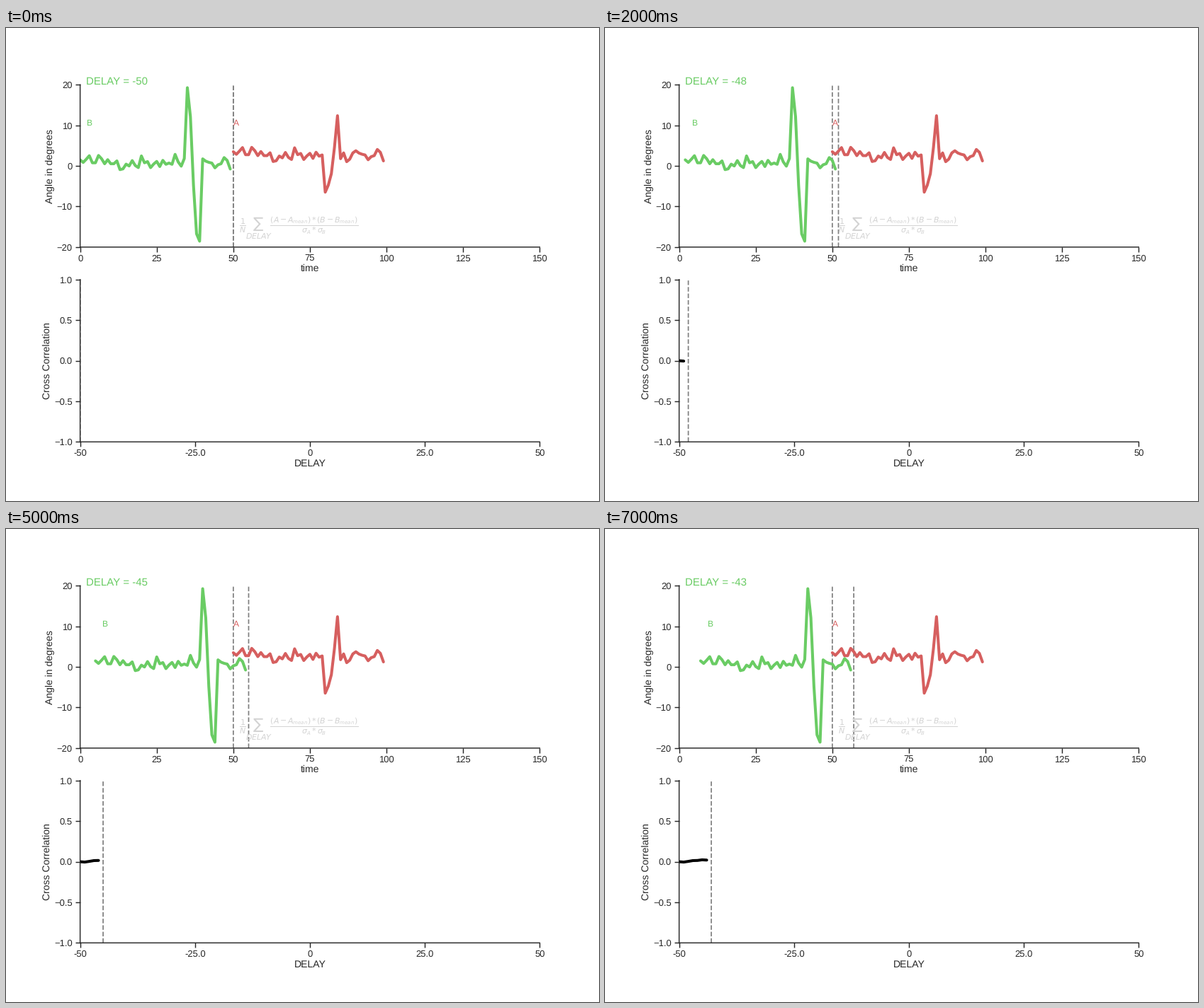
Animation of 837 by 669 pixels, one loop 8 s. Source, as a matplotlib script:

```python
import numpy as np
import matplotlib.pyplot as plt
from matplotlib.animation import FuncAnimation

W, H, DPI = 837, 669, 83.7
GREEN, RED, INK = "#6acc64", "#d65f5f", "#262626"
N, FRAMES = 50, 8

plt.rcParams.update({
    "font.family": "Liberation Sans", "text.color": INK,
    "text.hinting": "none", "text.hinting_factor": 1, "path.snap": False,
    "axes.labelcolor": INK, "axes.edgecolor": INK,
    "axes.labelsize": 12, "axes.linewidth": 1.25,
    "axes.spines.top": False, "axes.spines.right": False,
    "lines.solid_capstyle": "round", "xtick.major.pad": 2.7,
})
for axis in ("xtick", "ytick"):
    plt.rcParams.update({
        f"{axis}.color": INK, f"{axis}.labelsize": 11,
        f"{axis}.major.size": 6, f"{axis}.major.width": 1.25})

# Both signals share the same noise; each adds a short burst of one sine wave.
steps = np.arange(N)
noise = np.random.RandomState(42).randn(N)
wave = np.sin(np.linspace(0, 12 * np.pi, N))


def signal(offset, gain, start):
    burst = (steps >= start) & (steps < start + 5)
    return noise + offset + gain * wave * burst


sig_a = signal(3, 10, 30)
sig_b = signal(1, 20, 35)


def correlation(shift):
    overlap = np.dot(sig_a[:shift], sig_b[N - shift:])
    return overlap / (N * sig_a.std() * sig_b.std())


corr = [correlation(s) for s in range(FRAMES)]

fig, (top, low) = plt.subplots(2, 1, figsize=(W / DPI, H / DPI), dpi=DPI)
fig.subplots_adjust(left=0.125, right=0.9, bottom=0.125, top=0.88, hspace=0.2)

top.set(xlim=(0, 150), ylim=(-20, 20),
        xticks=range(0, 151, 25), yticks=range(-20, 21, 10))
low.set(xlim=(-50, 50), ylim=(-1, 1), yticks=np.arange(-1, 1.1, 0.5))
low.set_xticks([-50, -25, 0, 25, 50], ["-50", "-25.0", "0", "25.0", "50"])
for ax, xlabel, ylabel in ((top, "time", "Angle in degrees"),
                           (low, "DELAY", "Cross Correlation")):
    ax.set_xlabel(xlabel, labelpad=1.7)
    ax.set_ylabel(ylabel, labelpad=2.5)


def dashed(ax, x):
    return ax.axvline(x, color="gray", ls="--", lw=1.5)


dashed(top, N)
top_mark, low_mark = dashed(top, N), dashed(low, -N)
top.plot(steps + N, sig_a, color=RED, lw=3.5)
b_line, = top.plot([], [], color=GREEN, lw=3.5)
corr_line, = low.plot([], [], color="k", lw=3.5)

title = top.text(2, 20, "", color=GREEN, size=13.2)
b_label = top.text(2, 10, "B", color=GREEN, size=10.5)
top.text(N, 10, "A", color=RED, size=10.5)
top.text(52, -15.3, r"$\frac{1}{N}\sum_{DELAY}"
         r"\frac{(A-A_{mean})*(B-B_{mean})}{\sigma_A*\sigma_B}$",
         color="lightgray", size=13.2)


def update(i):
    title.set_text(f"DELAY = {i - N}")
    b_line.set_data(steps + i, sig_b)
    b_label.set_x(2 + i)
    top_mark.set_xdata([N + i] * 2)
    low_mark.set_xdata([i - N] * 2)
    corr_line.set_data(np.arange(i) - N, corr[:i])
    return title, b_line, b_label, top_mark, low_mark, corr_line


anim = FuncAnimation(fig, update, frames=FRAMES, interval=1000, repeat=True)
plt.show()
```
